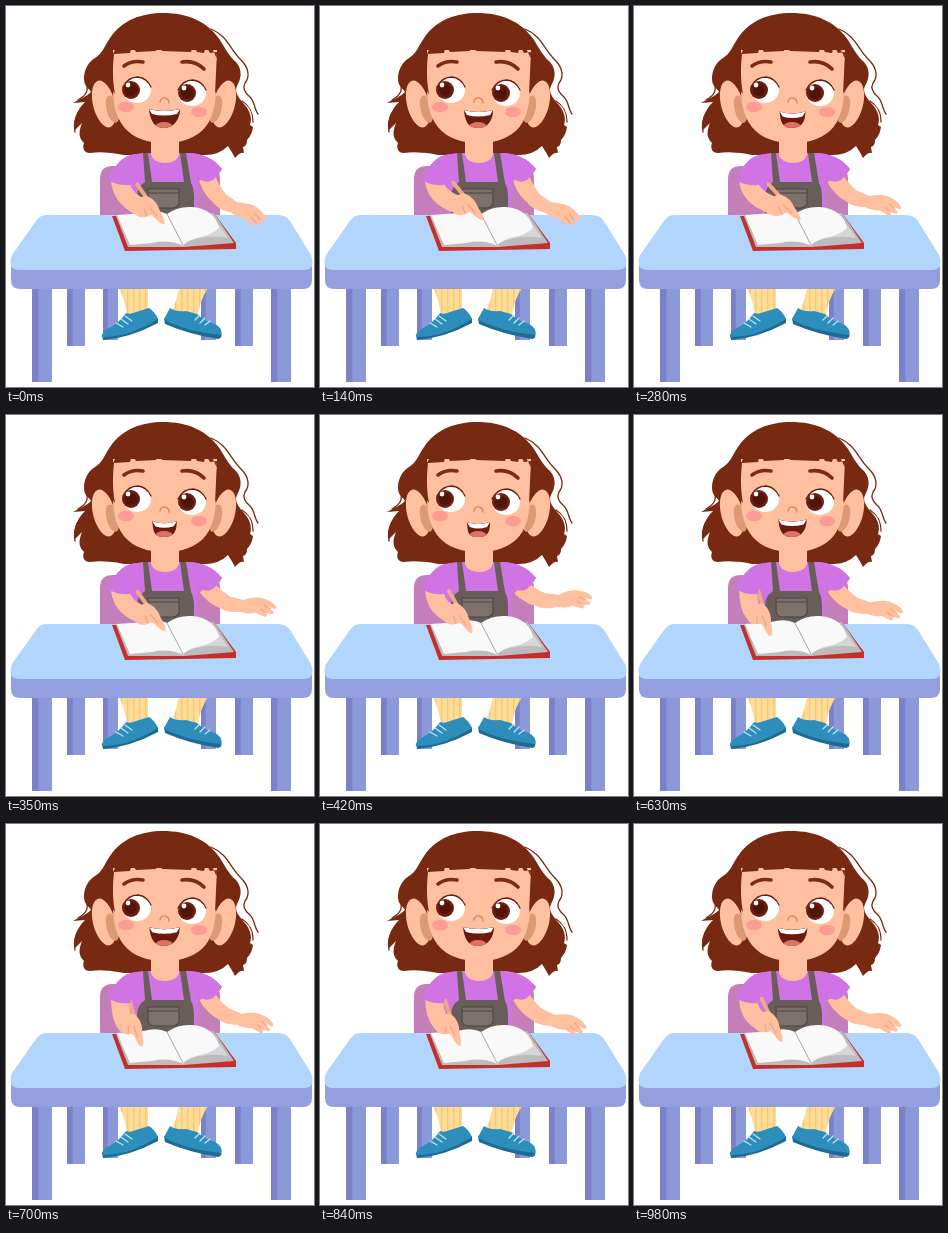
An HTML page for the animation above (1050 ms loop, 308x381 px).

```html
<!DOCTYPE html>
<html lang="en">
<head>
<meta charset="utf-8">
<title>Girl writing at a desk</title>
<style>
html, body { margin: 0; width: 100%; height: 100%; overflow: hidden; background: #fff; }
svg { display: block; width: 100vw; height: 100vh; }
.hair { fill: #772911; }
.skin { fill: #ffc09f; }
.shirt { fill: #d073e4; }
.line { fill: none; stroke-linecap: round; stroke-linejoin: round; }
</style>
</head>
<body>
<svg viewBox="0 0 308 381" preserveAspectRatio="none">
  <defs>
    <pattern id="stripes" width="6" height="6" patternUnits="userSpaceOnUse">
      <rect width="6" height="6" fill="#ffdd96"/>
      <rect x="1" width="1.4" height="6" fill="#f3c879"/>
    </pattern>
    <clipPath id="mouthClip"><path id="mouthEdge"/></clipPath>
  </defs>

  <!-- chair -->
  <path fill="#c47fbb" d="M94 212V173Q94 160 107 160H201Q214 160 214 173V212Z"/>

  <g id="legs"></g>

  <!-- trousers and shoes -->
  <path fill="url(#stripes)" d="M113 282H142V306L121 309Q119 294 113 282Z M173 282H202Q194 294 192 309L166 305Q171 294 173 282Z"/>
  <path fill="#1d6b93" d="M96 329L97 334Q124 332 152 317V312Z M158 312L159 318Q182 328 212 333Q217 332 215 325Z"/>
  <path fill="#2e8ebb" d="M120 307Q124 309 130 306L143 302Q149 306 152 313Q138 322 120 328Q107 331 96 331Q95 326 103 322Q113 317 120 307Z"/>
  <path fill="#2e8ebb" d="M164 302Q170 306 180 305L191 308Q198 315 209 318Q217 322 215 329Q188 326 173 320Q163 317 158 313Z"/>
  <path class="line" stroke="#bfe6f5" stroke-width="1.2" d="M115 313L122 318M119 310L126 315M110 317L117 321M189 314L194 309M194 317L199 312M199 319L204 315"/>

  <!-- back hair -->
  <path class="hair" d="M157 7C136 7 116 14 104 32C98 41 96 48 89 52C81 57 78 65 78 73C78 81 84 83 85 86C80 91 74 93 67 97L79 96C71 104 67 114 69 124L76 117C72 127 73 132 78 137C76 142 78 147 84 147Q99 145 118 149H199Q213 149 222 140Q226 146 229 152Q234 146 238 147L237 141Q241 140 241 134Q246 129 247 121L244 119C247 110 242 102 237 97C233 92 228 86 231 80C235 73 237 64 230 56C223 50 219 42 214 34C201 15 181 7 157 7Z"/>
  <g class="line" stroke="#772911" stroke-width="1.3">
    <path d="M205 23C222 30 224 44 235 54C243 62 244 71 239 77C236 83 239 87 244 91C249 96 248 103 252 108"/>
    <path d="M236 95C244 100 247 106 247 116M80 75C83 84 81 89 72 94M78 100C71 106 67 114 69 126"/>
  </g>

  <!-- body -->
  <path class="shirt" d="M137 147C118 149 108 160 102 174Q111 180 124 179L128 212H190L193 172Q202 179 208 174Q213 168 216 163C207 152 195 147 181 147Z"/>
  <path class="line" stroke="#b45fc9" stroke-width="1" d="M193 173L190 163"/>
  <path class="skin" d="M145 128H173V149Q170 157 159 157Q148 157 145 149Z"/>
  <path fill="#695d59" d="M137 147H142L146 176H178L174 147H180L185 177Q188 182 188 192V212H131V191Q131 181 139 176Z"/>
  <path fill="#7d716c" stroke="#4c4340" stroke-width="1.1" d="M142 183H173V198Q171 202 166 202H150Q143 202 142 197Z"/>
  <path class="line" stroke="#4c4340" stroke-width="1.1" d="M143 187H172"/>

  <!-- head -->
  <g id="ears"></g>
  <path class="skin" d="M107 44V80C107 94 108 101 112 111C118 126 132 134 146 136Q158 138 172 136C186 133 200 126 205 111C209 101 211 94 211 44Z"/>
  <path class="hair" d="M109 88C106 72 107 58 108 48L124 47L126 39L130 46L150 45L152 38L156 45L185 46L187 38L191 46L198 47L200 40L204 47L211 46L209 88C218 70 217 22 157 20C101 22 96 70 109 88Z"/>
  <path class="line" stroke="#7c2b15" stroke-width="3.6" d="M118 60Q126 54 137 56M176 56Q189 54 198 63"/>
  <g id="eyes"></g>
  <path class="line" stroke="#d98865" stroke-width="1.4" d="M154 96Q155 91 159 92Q163 93 163 97"/>
  <ellipse cx="120" cy="101" rx="8" ry="5.2" fill="#ff9b95"/>
  <ellipse cx="193" cy="106" rx="8" ry="5.2" fill="#ff9b95"/>

  <g clip-path="url(#mouthClip)">
    <rect x="135" y="95" width="50" height="32" fill="#6b1a10"/>
    <ellipse cx="158" cy="121" rx="9" ry="5" fill="#dd7264"/>
    <path id="teeth" fill="#fff"/>
  </g>

  <!-- table -->
  <path fill="#949fdf" d="M5 254H306V274Q306 283 297 283H14Q5 283 5 274Z"/>
  <path fill="#b2d5fe" d="M40 209H272Q280 209 284 215L305 249Q310 264 298 264H13Q1 264 6 249L30 215Q34 209 40 209Z"/>

  <!-- book -->
  <path fill="#c3302a" d="M106 210L119 245L230 243V237L208 207Z"/>
  <path fill="#bcbcbe" d="M110 210L122 241L178 241L228 237L208 207Z"/>
  <path fill="#d6d6d8" d="M176 238Q198 228 222 232L213 219Q206 229 190 230Z"/>
  <path fill="#f9f9f9" d="M111 209Q127 208 137 207Q152 203 161 208L178 240Q162 233 146 237L124 239Z"/>
  <path fill="#f9f9f9" d="M161 208Q172 200 186 201Q198 202 205 208Q212 215 213 222Q206 229 194 231Q184 233 177 239Z"/>
  <path class="line" stroke="#a9a9ae" stroke-width="1" d="M161 208L177 239"/>

  <!-- resting arm -->
  <g id="restArm">
    <path class="skin" d="M4 -8C11 -4 17 -1 24 1L38 1C44 -3 50 -6 57 -6C64 -6 69 -4 72 -1Q72 2 67 1L61 0L70 4Q72 7 67 7L60 5L65 9Q65 12 61 11L53 10C48 13 43 13 38 13C31 16 24 17 18 15C9 14 0 10 -6 5Z"/>
    <path class="line" stroke="#ee9f7b" stroke-width="1" d="M59 0L66 2M57 5L65 7"/>
  </g>
  <path class="shirt" d="M181 147C196 147 207 152 216 163Q212 170 207 174Q201 178 193 173Z"/>

  <!-- writing arm -->
  <path id="foreArm" class="line" stroke="#ffc09f" stroke-width="18"/>
  <g id="hand">
    <path class="line" stroke="#f0a987" stroke-width="4" d="M-47 0L-20 0"/>
    <path class="skin" d="M1 0C-3 -3 -9 -3 -14 -4C-20 -6 -29 -5 -33 0L-35 7C-36 15 -29 21 -21 18C-15 15 -15 10 -14 6C-10 4 0 4 1 0Z"/>
    <path class="line" stroke="#ee9f7b" stroke-width="1" d="M-10 2L-21 3M-16 10L-23 8"/>
  </g>
  <path class="shirt" d="M130 148C116 149 108 160 102 174Q111 180 124 179Q128 163 130 148Z"/>
</svg>

<script>
const STEP = 70, STEPS = 15;
const $ = id => document.getElementById(id);

// Each key: [step, value]
const armAngle = [[0, 35], [2, 35], [4, 23.5], [6, 7.5], [8, 15.5], [10, 23], [12, 25], [14, 23.5], [15, 35]];
const tipX = [[0, 158], [2, 163], [4, 166], [6, 152], [8, 138], [10, 136], [12, 140], [14, 148], [15, 158]];
const tipY = [[0, 217], [2, 213], [4, 213], [6, 217], [8, 219], [10, 222], [12, 221], [14, 217], [15, 217]];
const smile = [[0, 1], [2, .82], [4, .48], [6, .22], [8, .5], [10, .95], [12, 1], [14, .85], [15, 1]];

function at(keys, n) {
  const i = Math.max(1, keys.findIndex(k => k[0] >= n));
  const [a, va] = keys[i - 1], [b, vb] = keys[i];
  return va + (vb - va) * (n - a) / (b - a);
}

function tableLeg(x, width, bottom) {
  const side = width * .32;
  return `<path fill="#8b99d9" d="M${x} 280h${width}V${bottom}h${-width}z"/>` +
    `<path fill="#7b81c9" d="M${x} 280h${side}V${bottom}h${-side}z"/>`;
}

function ear(x, side) {
  return `<g transform="translate(${x} 98) scale(${side} 1)">` +
    '<ellipse class="skin" rx="11" ry="24" transform="rotate(-14)"/>' +
    '<ellipse cx="7" cy="7" rx="6" ry="14" fill="#dd9974" transform="rotate(-14)"/></g>';
}

function eye(x, y, irisX, irisY) {
  return `<ellipse cx="${x}" cy="${y}" rx="14" ry="13" fill="#fff"/>` +
    `<circle cx="${irisX}" cy="${irisY}" r="9" fill="#6a1d10"/>` +
    `<circle cx="${irisX}" cy="${irisY}" r="6" fill="#521309"/>` +
    `<circle cx="${irisX - 3}" cy="${irisY - 5}" r="2.4" fill="#fff"/>` +
    `<path class="line" stroke="#6a1d10" stroke-width="1.3" d="M${x - 14} ${y - 3}Q${x - 9} ${y - 13} ${x + 1} ${y - 13}Q${x + 10} ${y - 12} ${x + 14} ${y - 3}"/>`;
}

$("legs").innerHTML = [[97, 15, 334], [195, 15, 334], [61, 18, 340], [229, 18, 340], [26, 20, 376], [265, 20, 376]]
  .map(leg => tableLeg(...leg)).join("");
$("ears").innerHTML = ear(98, 1) + ear(218, -1);
$("eyes").innerHTML = eye(131, 84, 125, 84) + eye(186, 87, 181, 87);

function drawMouth(open) {
  const half = 10.5 + 5 * open, top = 108 - 5 * open;
  const left = 158.5 - half, right = 158.5 + half;
  const upper = `M${left} ${top}Q158 ${top + 4} ${right} ${top}`;
  $("mouthEdge").setAttribute("d", `${upper}C${right} ${top + 10} 168 122 158 122C148 122 ${left + 1} ${top + 11} ${left} ${top}Z`);
  $("teeth").setAttribute("d", `${upper}L${right - 3} ${top + 5}Q158 ${top + 8} ${left + 3} ${top + 5}Z`);
}

function drawWriting(x, y) {
  const angle = 75 - (x - 136) * .9, rad = angle * Math.PI / 180;
  const cos = Math.cos(rad), sin = Math.sin(rad);
  const wristX = x - 28 * cos - 11 * sin, wristY = y - 28 * sin + 11 * cos;
  $("hand").setAttribute("transform", `translate(${x} ${y}) rotate(${angle})`);
  $("foreArm").setAttribute("d", `M114 172Q114 190 ${wristX} ${wristY}`);
}

function draw(ms) {
  const n = Math.floor(ms / STEP) % STEPS;
  $("restArm").setAttribute("transform", `translate(201 174) rotate(${at(armAngle, n)})`);
  drawWriting(at(tipX, n), at(tipY, n));
  drawMouth(at(smile, n));
}

const start = performance.now();
function tick() {
  draw(performance.now() - start);
  requestAnimationFrame(tick);
}
tick();
</script>
</body>
</html>
```
